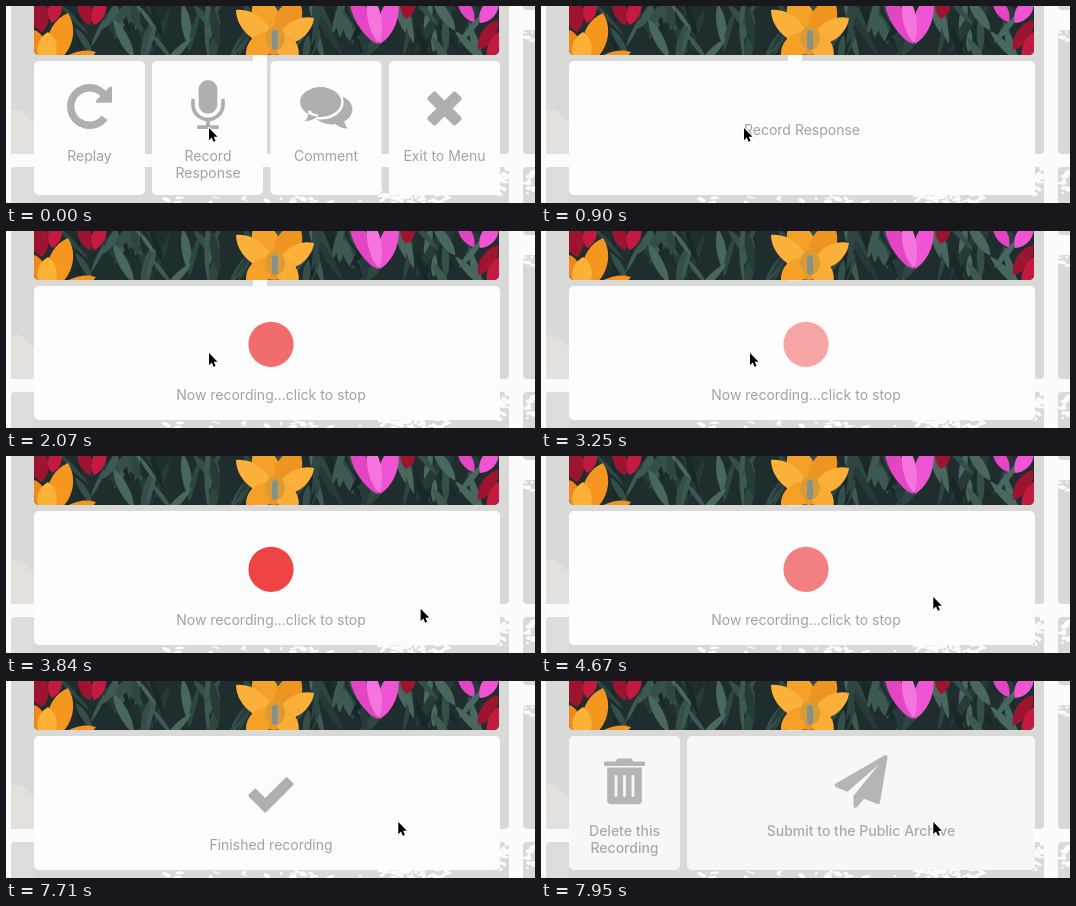
An HTML page with a canvas that plays this animation: 529x197 px, repeating every 8000 ms.

```html
<!DOCTYPE html>
<html lang="en">
<head>
<meta charset="utf-8">
<title>Record a response</title>
<style>
html, body { margin: 0; width: 100%; height: 100%; overflow: hidden; background: #fcfcfc; }
canvas { display: block; width: 529px; height: 197px; }
</style>
</head>
<body>
<canvas id="stage"></canvas>
<script>
const W = 529, H = 197, LOOP = 8000;
const DPR = window.devicePixelRatio || 1;
const PAGE = '#fcfcfc', GRAY = '#d9d9d8', CARD = '#fdfdfd', ICON = '#afafaf', LABEL = '#a2a2a2';

function setup(canvas) {
  canvas.width = W * DPR;
  canvas.height = H * DPR;
  const c = canvas.getContext('2d');
  c.scale(DPR, DPR);
  return c;
}

function layer(draw) {
  const canvas = document.createElement('canvas');
  draw(setup(canvas));
  return canvas;
}

let seed = 11;
function rnd(a, b) {
  seed = (seed * 16807) % 2147483647;
  return a + (b - a) * seed / 2147483647;
}

const clamp = v => Math.max(0, Math.min(1, v));
const ramp = (t, a, b) => clamp((t - a) / (b - a));
const smooth = v => v * v * (3 - 2 * v);

function box(c, x, y, w, h, r, color) {
  c.beginPath();
  c.roundRect(x, y, w, h, r);
  c.fillStyle = color;
  c.fill();
}

function poly(c, pts) {
  c.beginPath();
  pts.forEach(p => c.lineTo(p[0], p[1]));
  c.closePath();
}

function oval(c, x, y, rx, ry, turn = 0) {
  c.beginPath();
  c.ellipse(x, y, rx, ry, turn, 0, Math.PI * 2);
}

function label(c, text, x, y, weight = 400) {
  c.font = weight + ' 14px Inter, "Open Sans", sans-serif';
  c.textAlign = 'center';
  c.fillStyle = LABEL;
  c.fillText(text, x, y);
}

// ---- backdrop ----

function specks(c, n, x0, y0, x1, y1) {
  c.fillStyle = PAGE;
  for (let i = 0; i < n; i++) {
    oval(c, rnd(x0, x1), rnd(y0, y1), rnd(1, 5), rnd(0.6, 2.2), rnd(-0.5, 0.5));
    c.fill();
  }
}

function petal(c, x, y, tx, ty, w, color) {
  const dx = tx - x, dy = ty - y, d = Math.hypot(dx, dy);
  const nx = -dy / d * w, ny = dx / d * w;
  const side = k => [x + dx * 0.25 + nx * k, y + dy * 0.25 + ny * k,
                     x + dx * 0.75 + nx * k, y + dy * 0.75 + ny * k];
  c.beginPath();
  c.moveTo(x, y);
  c.bezierCurveTo(...side(1), tx, ty);
  const b = side(-1);
  c.bezierCurveTo(b[2], b[3], b[0], b[1], x, y);
  c.fillStyle = color;
  c.fill();
}

function photo(c) {
  c.save();
  c.beginPath();
  c.roundRect(28, -10, 465, 59, 5);
  c.clip();
  c.fillStyle = '#1f2d2e';
  c.fillRect(28, 0, 465, 49);
  const greens = ['#2e4642', '#3c5a53', '#273a3b', '#48685f', '#1a2728', '#344f49'];
  for (let i = 0; i < 95; i++) {
    const x = rnd(60, 490), y = rnd(15, 62), lean = rnd(-34, 34);
    petal(c, x, y, x + lean, y - rnd(22, 50), rnd(2.5, 7), greens[i % greens.length]);
  }
  const red = '#9c1430', crimson = '#c51a40';
  petal(c, 36, 26, 30, -10, 13, red);
  petal(c, 46, 17, 52, -10, 9, crimson);
  petal(c, 84, 19, 74, -10, 9, red);
  petal(c, 88, 19, 98, -10, 9, crimson);
  petal(c, 400, 13, 404, -14, 10, red);
  petal(c, 472, 44, 492, 14, 9, red);
  petal(c, 482, 56, 498, 24, 10, crimson);

  petal(c, 34, 62, 29, 24, 13, '#ef871d');
  petal(c, 46, 58, 62, 7, 16, '#f5971f');
  petal(c, 40, 60, 42, 26, 13, '#fcb236');
  petal(c, 52, 58, 90, 46, 8, '#f2941f');

  petal(c, 372, 38, 344, -12, 11, '#e445c4');
  petal(c, 374, 38, 390, -12, 12, '#ef55d2');
  petal(c, 373, 37, 364, -12, 9, '#f674de');
  petal(c, 468, 16, 452, -10, 8, '#e445c4');
  petal(c, 474, 17, 492, -8, 10, '#ef55d2');

  oval(c, 268, 27, 23, 22);
  c.fillStyle = '#ee941f';
  c.fill();
  petal(c, 268, 36, 252, -12, 18, '#f4a12a');
  petal(c, 272, 36, 292, -8, 17, '#ee9420');
  petal(c, 268, 38, 230, 4, 14, '#fbb13a');
  petal(c, 270, 38, 308, 12, 13, '#fbb03a');
  petal(c, 264, 26, 242, 58, 15, '#f6a028');
  petal(c, 272, 26, 290, 58, 14, '#f9ad36');
  oval(c, 269, 32, 10, 12);
  c.fillStyle = '#d99a3a';
  c.fill();
  box(c, 266, 24, 6, 20, 3, '#84938a');
  c.restore();
}

const backdrop = layer(c => {
  c.fillStyle = PAGE;
  c.fillRect(0, 0, W, H);
  box(c, 5, -10, 498, 158, 4, GRAY);
  box(c, 5, 161, 498, 50, 4, GRAY);
  box(c, 517, -10, 30, 14, 4, GRAY);
  box(c, 517, 24, 30, 124, 4, GRAY);
  box(c, 517, 161, 30, 50, 4, GRAY);
  poly(c, [[5, 104], [15, 104], [28, 116], [28, 148], [5, 148]]);
  c.fillStyle = '#e3e0dd';
  c.fill();
  box(c, 5, 161, 23, 50, 4, '#dfdddb');
  c.fillStyle = PAGE;
  c.fillRect(247, 49, 14, 99);
  specks(c, 45, 375, 184, 445, 197);
  specks(c, 22, 488, 160, 503, 188);
  specks(c, 20, 150, 191, 375, 197);
  specks(c, 9, 519, 20, 529, 36);
  specks(c, 12, 519, 163, 529, 190);
  photo(c);
});

// ---- icons ----

function pen(c, width, color = ICON) {
  c.lineWidth = width;
  c.strokeStyle = c.fillStyle = color;
  c.lineCap = 'butt';
  c.lineJoin = 'miter';
}

// Solid polygon with rounded corners
function blob(c, pts) {
  pen(c, 3);
  c.lineJoin = 'round';
  poly(c, pts);
  c.fill();
  c.stroke();
}

function replayIcon(c) {
  pen(c, 7.5);
  c.beginPath();
  c.arc(83.5, 100.5, 18.75, 0.64, Math.PI * 1.77);
  c.stroke();
  blob(c, [[104.5, 82], [104.5, 95.2], [91.3, 95.2]]);
}

function micIcon(c) {
  box(c, 192.6, 74, 18.8, 33.7, 9.4, ICON);
  pen(c, 3.75);
  c.lineCap = 'round';
  c.beginPath();
  c.moveTo(187, 94.3);
  c.lineTo(187, 98.4);
  c.arc(202, 98.4, 15, Math.PI, 0, true);
  c.lineTo(217, 94.3);
  c.moveTo(202, 114);
  c.lineTo(202, 120);
  c.moveTo(192.6, 121);
  c.lineTo(211.4, 121);
  c.stroke();
}

function bubble(c, x, y, rx, ry, dir) {
  oval(c, x, y, rx, ry);
  c.moveTo(x - dir * 12, y + ry - 7);
  c.quadraticCurveTo(x - dir * 12, y + ry + 1, x - dir * 16, y + ry + 4);
  c.quadraticCurveTo(x - dir * 7, y + ry + 4, x - dir * 2, y + ry - 2);
}

function commentIcon(c) {
  pen(c, 1);
  bubble(c, 326, 103.4, 20.5, 15, -1);
  c.fill();
  pen(c, 5, CARD);
  oval(c, 314.6, 96, 20.6, 15);
  c.stroke();
  pen(c, 1);
  bubble(c, 314.6, 96, 20.6, 15, 1);
  c.fill();
}

function crossIcon(c) {
  for (const k of [-1, 1]) {
    c.save();
    c.translate(438.5, 102.5);
    c.rotate(k * Math.PI / 4);
    box(c, -19.8, -5.7, 39.6, 11.4, 2, ICON);
    c.restore();
  }
}

function checkIcon(c) {
  blob(c, [[243.9, 114.6], [249.3, 109.2], [259.2, 119.1],
    [280.6, 97.7], [286, 103.1], [259.2, 129.9]]);
}

function trashIcon(c) {
  box(c, 63, 80.4, 41, 4.6, 1.2, ICON);
  poly(c, [[74.5, 81], [76.6, 77.5], [90.4, 77.5], [92.5, 81]]);
  c.fill();
  box(c, 66.2, 86.6, 34.6, 36.6, [0, 0, 4, 4], ICON);
  for (const x of [75, 83.5, 92]) box(c, x - 1.4, 94, 2.8, 22, 1.4, CARD);
}

function planeIcon(c) {
  c.save();
  c.translate(293.5, 74);
  c.scale(0.0296, 0.0296);
  poly(c, [[1764, 11], [1791, 75], [1535, 1611], [1503, 1656], [1448, 1659],
    [995, 1474], [753, 1769], [704, 1792], [655, 1775], [640, 1728], [640, 1379],
    [1504, 320], [435, 1245], [40, 1083], [0, 1028], [32, 969], [1696, 9], [1728, 0]]);
  c.fillStyle = ICON;
  c.fill();
  c.restore();
}

// ---- panels ----

const card = (c, x, w) => box(c, x, 55, w, 134, 5, CARD);

const menu = layer(c => {
  [28, 146, 264.5, 383].forEach(x => card(c, x, 111));
  replayIcon(c);
  micIcon(c);
  commentIcon(c);
  crossIcon(c);
  label(c, 'Replay', 83.5, 155);
  label(c, 'Record', 202, 155);
  label(c, 'Response', 202, 172);
  label(c, 'Comment', 320, 155);
  label(c, 'Exit to Menu', 438.5, 155);
});

const panel = layer(c => card(c, 28, 466));
const heading = layer(c => label(c, 'Record Response', 261, 129));
const hint = layer(c => label(c, 'Now recording...click to stop', 265, 169));

const done = layer(c => {
  checkIcon(c);
  label(c, 'Finished recording', 265, 169);
});

const choices = layer(c => {
  card(c, 28, 111);
  card(c, 146, 348);
  trashIcon(c);
  planeIcon(c);
  label(c, 'Delete this', 83.5, 155, 500);
  label(c, 'Recording', 83.5, 172, 500);
  label(c, 'Submit to the Public Archive', 320, 155, 500);
});

const pointer = [
  [2840, 203, 122], [3010, 193, 122], [3250, 209, 122], [3600, 377, 151],
  [3900, 419, 153], [4250, 419, 153], [4620, 392.3, 141]
];

function pointerAt(t) {
  let [, x, y] = pointer[0];
  for (let i = 1; i < pointer.length; i++) {
    const a = pointer[i - 1], b = pointer[i];
    const k = smooth(ramp(t, a[0], b[0]));
    x += (b[1] - a[1]) * k;
    y += (b[2] - a[2]) * k;
  }
  return [x, y];
}

function drawPointer(c, t) {
  const [x, y] = pointerAt(t);
  c.save();
  c.translate(x, y);
  c.scale(0.85, 0.85);
  poly(c, [[0, 0], [0, 14.3], [3.2, 11.3], [5.4, 16.3], [7.7, 15.3], [5.6, 10.4], [10, 10.2]]);
  c.lineJoin = 'round';
  c.lineWidth = 2.4;
  c.strokeStyle = '#fff';
  c.stroke();
  c.fillStyle = '#000';
  c.fill();
  c.restore();
}

const ctx = setup(document.getElementById('stage'));

function show(image, alpha) {
  if (alpha <= 0) return;
  ctx.globalAlpha = alpha;
  ctx.drawImage(image, 0, 0, W, H);
  ctx.globalAlpha = 1;
}

function render(t) {
  show(backdrop, 1);
  // The page behind the panel turns plain gray
  if (t >= 2240) box(ctx, 28, 49.5, 466, 139.5, 0, GRAY);
  show(menu, 1 - ramp(t, 180, 500));

  const open = ramp(t, 480, 880) * (1 - ramp(t, 7710, 7840));
  show(panel, open);
  show(heading, open * (1 - ramp(t, 1000, 1220)));

  const rec = ramp(t, 1200, 1430) * (1 - ramp(t, 5480, 5640));
  show(hint, rec);
  if (rec > 0) {
    const wave = (1 + Math.cos(Math.PI * Math.max(0, t - 1560) / 1250)) / 2;
    ctx.globalAlpha = rec * (0.24 + 0.75 * wave);
    oval(ctx, 265, 113.3, 22.6, 22.6);
    ctx.fillStyle = 'rgb(238, 55, 55)';
    ctx.fill();
    ctx.globalAlpha = 1;
  }

  show(done, open * ramp(t, 5620, 5790));
  show(choices, ramp(t, 7740, 7990));
  drawPointer(ctx, t);
}

let start;
function tick(now) {
  if (start === undefined) start = now;
  render((now - start) % LOOP);
  requestAnimationFrame(tick);
}
render(0);
requestAnimationFrame(tick);
</script>
</body>
</html>
```
